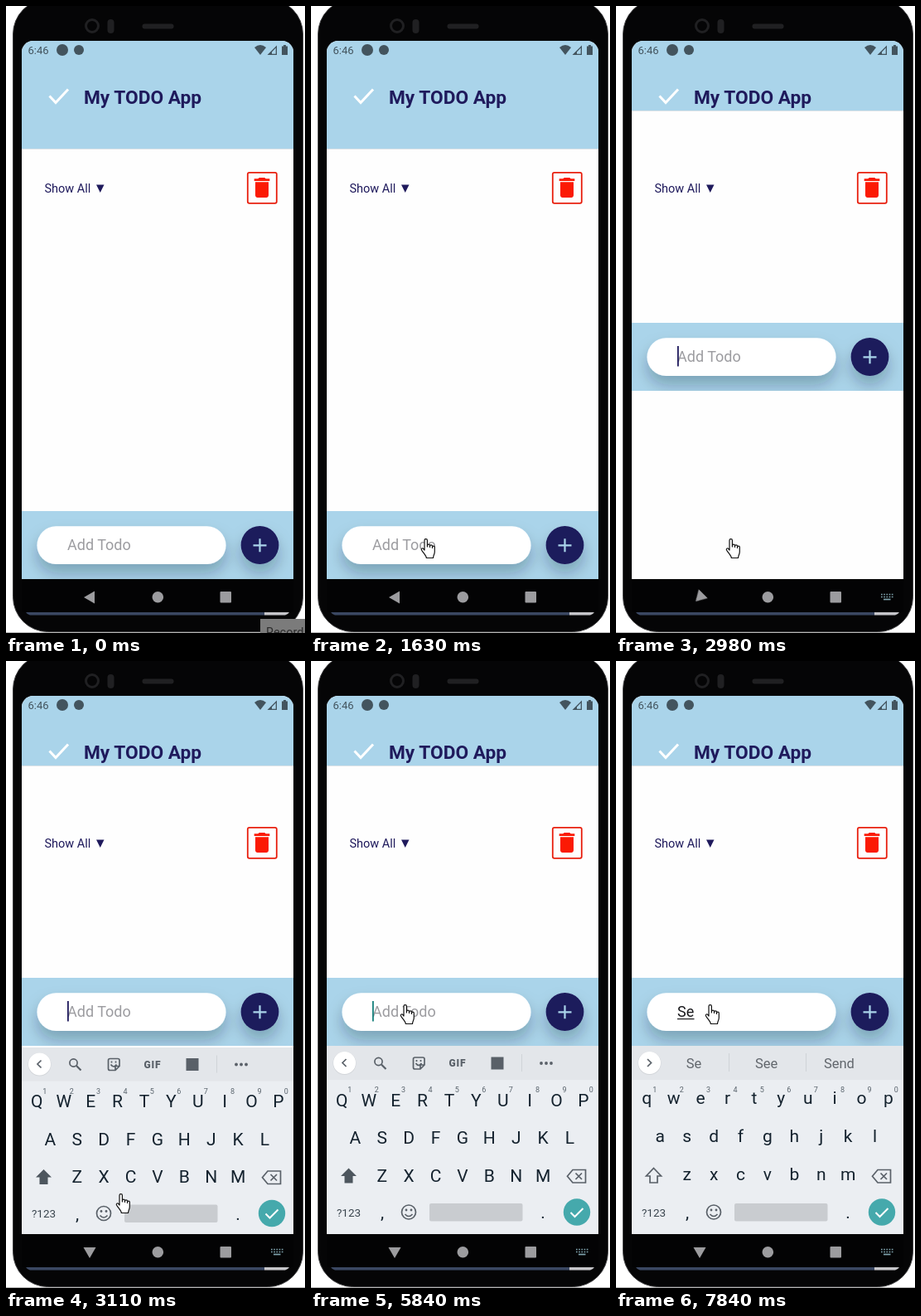
Recreate the animation shown at these times as an HTML page. Size 361x756 px, loop 8000 ms.

```html
<!DOCTYPE html>
<html lang="en">
<head>
<meta charset="utf-8">
<title>Todo app demo</title>
<style>
html, body { margin: 0; width: 100%; height: 100%; overflow: hidden; background: #fff; }
svg { display: block; width: 361px; height: 756px; font-family: Roboto, sans-serif; }
.navy { fill: #1f1a5c; }
.mid { text-anchor: middle; }
.icon { fill: none; stroke: #596068; stroke-width: 1.7; }
.key { font-size: 21px; fill: #14222e; text-anchor: middle; }
.hint { font-size: 9px; fill: #59636c; text-anchor: middle; }
.word { font-size: 16.5px; fill: #62676d; text-anchor: middle; }

/* 1% of the loop is 80 ms */
.a { animation: 8s step-end infinite; }
#tip { animation-name: tip; }
#cursor { animation-name: cursor; }
#click { animation-name: click; }
#header { animation-name: header; }
#bar { animation-name: bar; }
#back { animation-name: back; transform-origin: 101px 713px; }
#ime { animation-name: ime; }
#kb { animation-name: kb; }
#caret { animation-name: caret; }
#hold { animation-name: before-s; }
#s { animation-name: only-s; }
#se { animation-name: from-e; }
#upper { animation-name: before-low; }
#lower { animation-name: from-low; }
#tools { animation-name: tools; }
#words { animation-name: words; }
#words1 { animation-name: before-e; }
#words2 { animation-name: from-e; }

@keyframes tip { 0% { opacity: 1 } .875%, 100% { opacity: 0 } }
@keyframes cursor {
  0% { transform: translate(380px, 770px) }
  5.75% { transform: translate(354px, 746px); animation-timing-function: steps(11, start) }
  16.12% { transform: translate(142px, 662px) }
  16.125% { transform: translate(132px, 645px) }
  19.5% { transform: translate(132px, 643px) }
  20.375% { transform: translate(132px, 642px) }
  40.625% { transform: translate(132px, 642px); animation-timing-function: steps(10, start) }
  49.875% { transform: translate(113px, 405px) }
  50.75%, 100% { transform: translate(107px, 414px) }
}
@keyframes click { 0% { opacity: 0 } 30.375% { opacity: 1 } 32.25%, 100% { opacity: 0 } }
@keyframes header { 0% { transform: none } 35.625%, 100% { transform: translateY(-46px) } }
@keyframes bar { 0% { transform: none } 35.625%, 100% { transform: translateY(-227px) } }
@keyframes back {
  0% { transform: rotate(0) }
  35.625% { transform: rotate(0); animation-timing-function: linear }
  38.875%, 100% { transform: rotate(-90deg) }
}
@keyframes ime { 0% { opacity: 0 } 37.2%, 100% { opacity: 1 } }
@keyframes kb {
  0% { transform: translateY(240px) }
  38% { transform: translateY(50px) }
  38.8% { transform: translateY(1.5px) }
  40.6%, 100% { transform: none }
}
@keyframes caret {
  0% { opacity: 0; fill: #1f1a5c; transform: none }
  34.75% { opacity: 1 }
  42.4% { opacity: 0; fill: #16807c }
  48.7% { opacity: 1 }
  54.875% { opacity: 0 }
  59.875% { opacity: 1 }
  67.25% { opacity: 0 }
  72.25% { opacity: 1; transform: none }
  79.875% { opacity: 1; transform: translateX(10px) }
  86.5% { opacity: 0 }
  91.5% { opacity: 1; transform: translateX(20.5px) }
  98%, 100% { opacity: 0; fill: #16807c; transform: translateX(20.5px) }
}
@keyframes before-s { 0% { opacity: 1 } 79.875%, 100% { opacity: 0 } }
@keyframes only-s { 0% { opacity: 0 } 79.875% { opacity: 1 } 91.5%, 100% { opacity: 0 } }
@keyframes before-e { 0% { opacity: 1 } 91.5%, 100% { opacity: 0 } }
@keyframes from-e { 0% { opacity: 0 } 91.5%, 100% { opacity: 1 } }
@keyframes before-low { 0% { opacity: 1 } 80.625%, 100% { opacity: 0 } }
@keyframes from-low { 0% { opacity: 0 } 80.625%, 100% { opacity: 1 } }
@keyframes tools {
  0% { opacity: 1 }
  80.625% { opacity: 1; animation-timing-function: linear }
  82.4%, 100% { opacity: 0 }
}
@keyframes words {
  0% { opacity: 0 }
  81.5% { opacity: 0; animation-timing-function: linear }
  83.25%, 100% { opacity: 1 }
}
</style>
</head>
<body>
<svg viewBox="0 0 361 756">
  <defs>
    <clipPath id="screen"><path d="M19 735V56a14 14 0 0 1 14-14H333a14 14 0 0 1 14 14V735z"/></clipPath>
    <clipPath id="barClip"><rect x="19" y="609" width="328" height="82"/></clipPath>
    <clipPath id="kbClip"><rect x="19" y="464" width="328" height="227"/></clipPath>
    <filter id="shade" x="-30%" y="-50%" width="160%" height="260%">
      <feDropShadow dx="0" dy="11" stdDeviation="9" flood-color="#102030" flood-opacity=".27"/>
    </filter>
  </defs>

  <!-- phone -->
  <path d="M0 755.5H361" stroke="#b4b4b4"/>
  <rect x="8.5" y="-8" width="350" height="762.5" rx="42" fill="#050506" stroke="#3b3b3d"/>
  <g fill="#202022">
    <circle cx="104" cy="24" r="7.5" fill="none" stroke="#202022" stroke-width="3"/>
    <rect x="122.5" y="16" width="8" height="17" rx="4"/>
    <rect x="164.500" y="21.500" width="38" height="6" rx="3"/>
  </g>
  <path d="M24 731H312V734.500H29Q26 734 24 731z" fill="#3b4863"/>
  <path d="M312 731H342Q340 734 337 734.500H312z" fill="#c6c6ca"/>

  <g clip-path="url(#screen)">
    <rect x="19" y="42" width="328" height="649" fill="#fefefe"/>
    <g id="header" class="a">
      <rect x="19" y="171" width="328" height="2" fill="#dde3e7"/>
      <rect x="19" y="42" width="328" height="130" fill="#aad4ea"/>
    </g>
    <rect x="19" y="42" width="328" height="60" fill="#aad4ea"/>

    <!-- status bar -->
    <g fill="#43545e">
      <text x="26.500" y="58" font-size="13">6:46</text>
      <circle cx="68" cy="53" r="7"/>
      <circle cx="88" cy="53" r="6"/>
      <path d="M300 50Q307 44 314 50L307 59z"/>
      <path d="M327 47.500V59H315.500zM325.700 50.600L321 55.500V57.700H325.700z" fill-rule="evenodd"/>
      <path d="M333 48.500h2v-1.500h3v1.500h2V59h-7z"/>
    </g>

    <path d="M52.500 108.500L60 116.500L75 100.500" fill="none" stroke="#fff" stroke-width="3"/>
    <text class="navy" x="94" y="117.500" font-size="22.700" font-weight="700">My TODO App</text>
    <text class="navy" x="46.500" y="225" font-size="14.500">Show All</text>
    <path class="navy" d="M109 215.500h9.500l-4.750 9.500z"/>
    <rect x="291.800" y="200.800" width="35" height="37" rx="2" fill="none" stroke="#e8200f" stroke-width="1.800"/>
    <path transform="translate(293 203) scale(1.333)" fill="#fb1a04" d="M6 19c0 1.100.9 2 2 2h8c1.100 0 2-.9 2-2V7H6zM19 4h-3.500l-1-1h-5l-1 1H5v2h14z"/>

    <!-- entry bar -->
    <g id="bar" class="a">
      <g clip-path="url(#barClip)">
        <rect x="19" y="609" width="328" height="82" fill="#aad4ea"/>
        <g filter="url(#shade)">
          <rect x="37.500" y="627.300" width="228" height="45.700" rx="22.850" fill="#fff"/>
          <circle class="navy" cx="306.500" cy="650" r="22.900"/>
        </g>
      </g>
      <path d="M298.500 650.300h16M306.500 642.300v16" stroke="#aad4ea" stroke-width="2.200"/>
      <g font-size="18">
        <text id="hold" class="a" x="74" y="656" fill="#9c9ca0">Add Todo</text>
        <g fill="#1b1b1e">
          <g id="s" class="a"><text x="74" y="656">S</text><path d="M74 658h10.700v1.200H74z"/></g>
          <g id="se" class="a"><text x="74" y="656">Se</text><path d="M74 658h20.500v1.200H74z"/></g>
        </g>
      </g>
      <rect id="caret" class="a" x="74" y="637" width="1.800" height="24.500"/>
    </g>

    <!-- keyboard -->
    <g clip-path="url(#kbClip)">
      <g id="kb" class="a">
        <rect x="19" y="464" width="328" height="227" fill="#ebeef2"/>
        <rect x="19" y="464" width="328" height="41" fill="#e3e6ea"/>
        <circle cx="40.500" cy="485" r="14" fill="#d3d6da"/>
        <circle cx="40.500" cy="484.500" r="13.500" fill="#fff"/>
        <g id="tools" class="a">
          <g class="icon">
            <path d="M42.500 480l-4.500 4.500 4.500 4.500"/>
            <circle cx="81.500" cy="483" r="4.600"/>
            <path d="M85 486.500l5.500 5.500" stroke-width="2.200"/>
            <path d="M125.500 478h9.500q2 0 2 2v7l-5 5h-6.500q-2 0-2-2v-10q0-2 2-2zM137 487h-5v5M126.500 485q3.500 5 7 0"/>
            <path d="M127.500 481v2M132.500 481v2"/>
          </g>
          <text class="mid" x="177" y="489" font-size="12" font-weight="900" letter-spacing=".8" fill="#596068">GIF</text>
          <rect x="217.500" y="477.500" width="15" height="15" fill="#596068"/>
          <path d="M254.500 474v21" stroke="#cfd3d7"/>
          <g fill="#596068"><circle cx="278" cy="485" r="1.900"/><circle cx="284" cy="485" r="1.900"/><circle cx="290" cy="485" r="1.900"/></g>
        </g>
        <g id="words" class="a">
          <path class="icon" d="M38 480l4.500 4.500-4.500 4.500"/>
          <path d="M136.500 473v22M229.500 473v22" stroke="#cfd3d7"/>
          <g id="words1" class="a word"></g>
          <g id="words2" class="a word"></g>
        </g>
        <g id="hints"></g>
        <g id="upper" class="a"><path d="M45.500 611.500l9.500 9.500h-4.500v8.500h-10v-8.500H36z" fill="#4d565e"/></g>
        <g id="lower" class="a"><path class="icon" d="M45.500 611.500l9 9.500h-4.500v8h-9v-8h-4.500z"/></g>
        <path class="icon" d="M316 613.500h15.500v15.500H316l-6.500-7.750zM319.500 617.500l7.500 7.500M327 617.500l-7.500 7.500"/>
        <text class="mid" x="45.500" y="669.500" font-size="13.500" fill="#39444d">?123</text>
        <text class="key" x="86" y="672">,</text>
        <text class="key" x="280" y="672">.</text>
        <g class="icon"><circle cx="118" cy="664.500" r="8.500"/><path d="M113.500 667q4.500 5 9 0"/></g>
        <g fill="#596068"><circle cx="115" cy="662" r="1.400"/><circle cx="121" cy="662" r="1.400"/></g>
        <rect x="143" y="654" width="112.500" height="21.500" rx="2" fill="#c9ccd0"/>
        <circle cx="321" cy="664.500" r="16.200" fill="#45a9ac"/>
        <path d="M313.500 665l5 5 10-10" fill="none" stroke="#fff" stroke-width="2"/>
      </g>
    </g>

    <!-- navigation -->
    <rect x="19" y="691" width="328" height="40" fill="#030304"/>
    <g fill="#9c9c9f">
      <path id="back" class="a" d="M94 713L107 705.500V720.500z"/>
      <circle cx="183.300" cy="712.800" r="6.800"/>
      <rect x="258.500" y="706" width="13.500" height="13.500" rx="1"/>
    </g>
    <g id="ime" class="a" stroke="#7fa3ad" stroke-width="1.700">
      <path d="M320 709.500h15M320 712.500h15" stroke-dasharray="1.700 1.500"/>
      <path d="M323 715.500h8.500"/>
    </g>
  </g>

  <g id="tip" class="a">
    <rect x="307" y="739" width="54" height="17" fill="#7b7b7b"/>
    <text x="314" y="760" font-size="14.500" fill="#2b2b2b">Record</text>
  </g>
  <circle id="click" class="a" cx="138" cy="642" r="14.500" fill="#ff0" fill-opacity=".47"/>
  <path id="cursor" class="a" fill="#fff" stroke="#111" stroke-width="1.200" stroke-linejoin="round"
    d="M5 14V2.300a1.700 1.700 0 0 1 3.400 0V10V8.300a1.600 1.600 0 0 1 3.100 0V10.500V9.300a1.500 1.500 0 0 1 3 0V11.500V10.600a1.400 1.400 0 0 1 2.800 0V16c0 3.500-1.800 4.500-1.800 7.500H7.300c0-2.500-3-5-5.800-9.500c-.8-1.600 1-2.900 2.200-1.600z"/>
</svg>
<script>
const byId = id => document.getElementById(id);
const put = (id, html) => byId(id).insertAdjacentHTML('beforeend', html);
const label = (x, y, s, cls) => `<text class="${cls}" x="${x}" y="${y}">${s}</text>`;
const step = 32.4;

const rows = [['qwertyuiop', 37.3], ['asdfghjkl', 53.3], ['zxcvbnm', 85.7]];
rows.forEach(([letters, x0], r) => [...letters].forEach((c, i) => {
  const x = x0 + i * step, y = 536.5 + r * 45.7;
  put('upper', label(x, y, c.toUpperCase(), 'key'));
  put('lower', label(x, y - 2.3, c, 'key'));
  if (!r) put('hints', label(x + 9.5, 520, (i + 1) % 10, 'hint'));
}));

const suggest = (id, words) =>
  words.forEach((w, i) => put(id, label(94 + i * 87.7, 490.5, w, 'word')));
suggest('words1', ['S', 'So', 'She']);
suggest('words2', ['Se', 'See', 'Send']);
</script>
</body>
</html>
```
